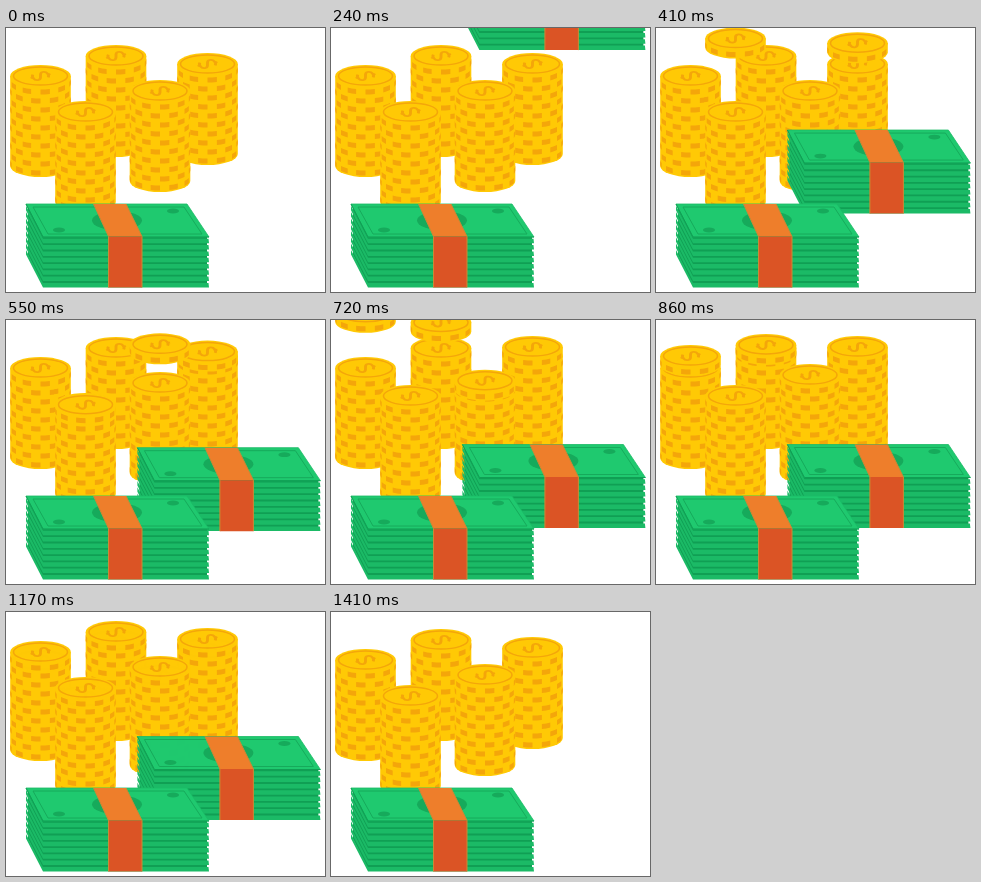
Animation of 319x264 px, one loop 1.74 s. Source, as an HTML page:

```html
<!DOCTYPE html>
<html lang="en">
<head>
<meta charset="utf-8">
<title>Coins and cash</title>
<style>
  html, body { margin: 0; width: 100%; height: 100%; overflow: hidden; background: #fff; }
  svg { display: block; width: 319px; height: 264px; }
</style>
</head>
<body>
<svg id="stage" viewBox="0 0 319 264" xmlns="http://www.w3.org/2000/svg"></svg>
<script>
const LOOP = 1740;
const GOLD = '#ffc905', AMBER = '#f4a60a';
const GREEN = '#1fc96f', EDGE = '#1bba66', DARK = '#109f54', INK = '#16aa5b';
const RX = 30.3, RY = 11, THICK = 9, LAYERS = 10, BLOCKS = 5;

// x, y: centre of the top face; the extra coin comes to rest `lift` above it
const stacks = [
  { x: 110, y: 28, lift: 8, from: -52, over: 5, start: 550, dur: 300 },
  { x: 201.5, y: 36, lift: 9, from: -47, over: 5, start: 225, dur: 300 },
  { x: 34.5, y: 48, lift: 8, from: -62, over: 5, start: 630, dur: 300 },
  { x: 154, y: 63, lift: 8, from: -86, over: 7, start: 382, dur: 300 },
  { x: 79.5, y: 84, lift: 8, from: -108, over: 9, start: 309, dur: 250 }
];
const cash = { x: 111.4, y: -51.5, from: -209, over: 6.5, start: 180, dur: 300 };

const points = list => list.map(p => p.join()).join(' ');

function face() {
  return `<ellipse rx="${RX}" ry="${RY}" fill="${GOLD}"/>
    <ellipse rx="27" ry="9" fill="none" stroke="${AMBER}" stroke-width="1.5"/>
    <g transform="scale(1.1 .68) rotate(72)" fill="none" stroke="${AMBER}" stroke-width="2.6">
      <path d="M4 -6C2 -8 -5 -8 -5 -3.5C-5 1 5 -1 5 3.5C5 8 -2 8 -4 6M0 -9.5V-7M0 7V9.5"/>
    </g>`;
}

// A mark on the rim: curved along the ellipse, with upright sides
function mark(a, b, y) {
  const at = v => [RX * Math.cos(v), y + RY * Math.sin(v)].map(n => n.toFixed(2)).join(' ');
  const arc = `A${RX} ${RY} 0 0 `;
  return `M${at(a)}${arc}1 ${at(b)}v5${arc}0 ${at(a).replace(/\S+$/, n => +n + 5)}Z`;
}

function coins(count, shift) {
  const h = count * THICK, w = Math.PI / BLOCKS / 2;
  let d = '';
  for (let i = 0; i < count; i++) {
    for (let j = 0; j < BLOCKS; j++) {
      const a = (2 * j + (i + shift) % 2) * w;
      d += mark(a, a + w, i * THICK + 2.5);
    }
  }
  return `<path d="M${-RX} 0V${h}A${RX} ${RY} 0 0 0 ${RX} ${h}V0Z" fill="${GOLD}"/>
    <path d="${d}" fill="${AMBER}"/>${face()}`;
}

function bundle() {
  const top = [[20, 176], [181, 176], [203, 209], [37, 209]];
  const core = [[22, 180], [180, 180], [201, 209], [201, 259], [38, 259], [22, 227]];
  const sheets = 8, step = 6.3;
  let s = `<polygon points="${points(core)}" fill="${DARK}"/>`;
  for (let i = sheets; i > 0; i--) {
    const y = i * step;
    const side = [[20, 171.5 + y], [37, 204.5 + y], [202.5, 204.5 + y], [203, 209 + y], [37, 209 + y], [20, 176 + y]];
    s += `<polygon points="${points(side)}" fill="${EDGE}"/>`;
  }
  return s + `<polygon points="${points(top)}" fill="${GREEN}" stroke="${EDGE}" stroke-width=".8"/>
    <path d="M20 176L37 209H203" fill="none" stroke="${DARK}"/>
    <path d="M27 179H178L196 206H42Z" fill="none" stroke="${INK}"/>
    <ellipse cx="111" cy="192.5" rx="25" ry="9.5" fill="${INK}"/>
    <ellipse cx="53" cy="202" rx="6" ry="2.4" fill="${INK}"/>
    <ellipse cx="167" cy="183" rx="6" ry="2.4" fill="${INK}"/>
    <path d="M87.5 176H120L136 208.5H102.5Z" fill="#ee7e2b"/>
    <path d="M102.5 208.5H136V259.5H102.5Z" fill="#db5425"/>
    <path d="M87.5 176L102.5 208.5V259.5M120 176L136 208.5V259.5" fill="none" stroke="#c98a35" stroke-width="1"/>`;
}

let html = '';
stacks.forEach((s, i) => {
  html += `<g transform="translate(${s.x} ${s.y})">${coins(LAYERS, 0)}</g>
    <g id="coin${i}">${coins(1, 1)}</g>`;
});
html += `<g id="cash">${bundle()}</g><g>${bundle()}</g>`;
document.getElementById('stage').innerHTML = html;

const drops = stacks.map((s, i) => ({
  ...s, y: s.y - s.lift, el: document.getElementById('coin' + i)
}));
drops.push({ ...cash, el: document.getElementById('cash') });

function ease(t, start, dur) {
  const u = Math.min(1, Math.max(0, (t - start) / dur));
  return u * u * (3 - 2 * u);
}

// Fall past the resting place, then settle back
function drop(t, d) {
  const fall = d.from + (d.over - d.from) * ease(t, d.start, d.dur);
  return fall - d.over * ease(t, d.start + d.dur, 140);
}

function draw(t) {
  const alpha = Math.min(1, Math.max(0, (1410 - t) / 240));
  for (const d of drops) {
    d.el.setAttribute('transform', `translate(${d.x} ${(d.y + drop(t, d)).toFixed(2)})`);
    d.el.setAttribute('opacity', t < d.start ? 0 : alpha);
  }
}

const begin = performance.now();
function tick() {
  draw((performance.now() - begin) % LOOP);
  requestAnimationFrame(tick);
}
tick();
</script>
</body>
</html>
```
